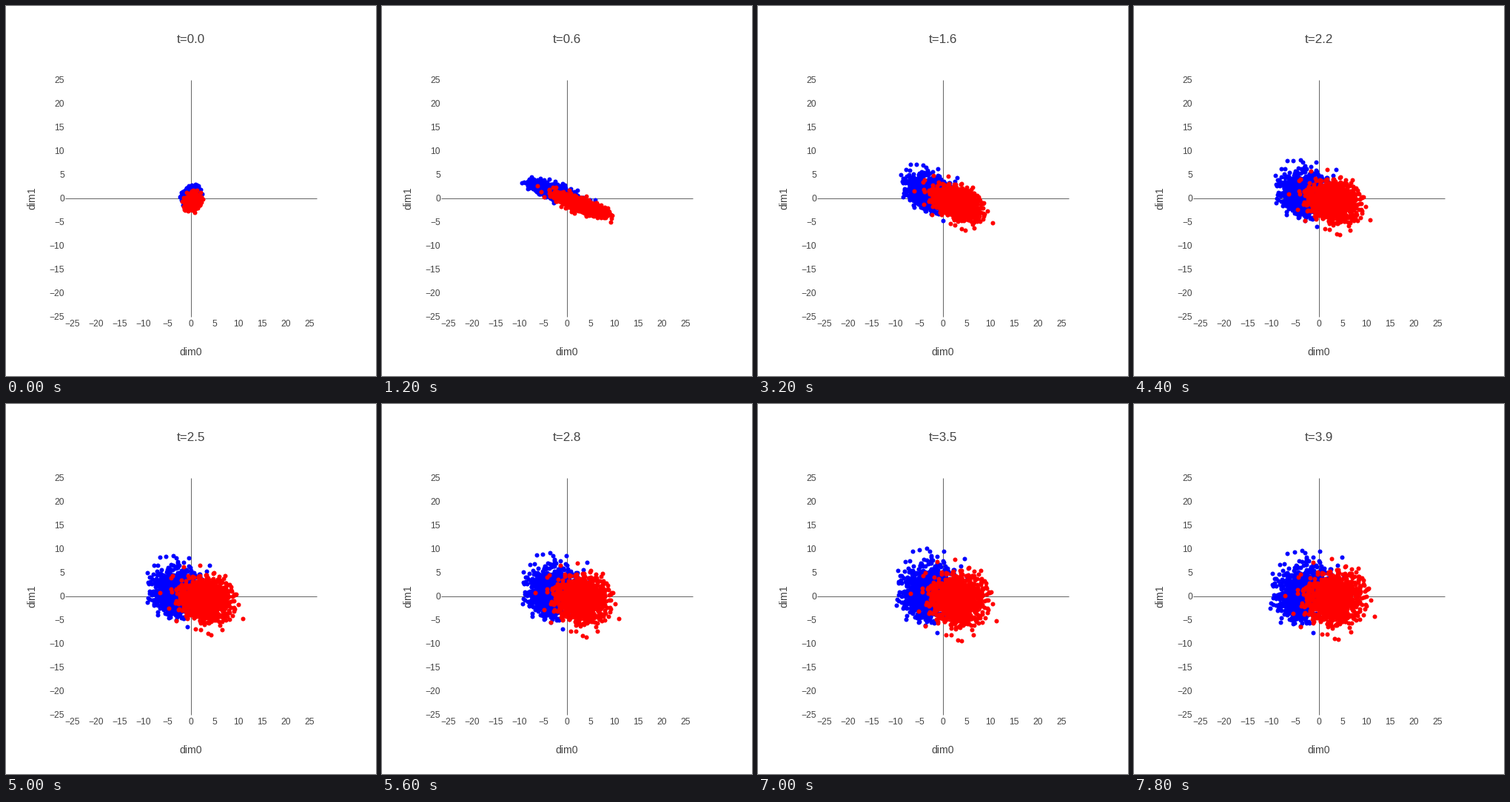
Animation of 500 by 500 pixels, one loop 8000 ms. Source, as a matplotlib script:

```python
import numpy as np
import matplotlib.pyplot as plt
from matplotlib.animation import FuncAnimation

SIZE, DPI = 500, 100
PX = 72 / DPI
FRAMES, INTERVAL = 40, 200
CENTER, UNIT = np.array([250, 260]), 6.4
INK = "#444444"

# The cloud moves by a linear map [[a, b], [c, d]] given at a few times.
KEY_T = [0, 0.6, 1.2, 1.6, 2.2, 2.8, 3.5, 3.9]
KEY_MAP = np.array([
    [0.165, 0.205, -0.165, 0.205],
    [0.92, 0.22, -0.37, 0.18],
    [0.88, 0.02, -0.23, 0.50],
    [0.87, -0.13, -0.16, 0.645],
    [0.93, -0.08, -0.05, 0.79],
    [0.96, -0.03, -0.015, 0.90],
    [1.0, 0.0, 0.0, 1.0],
    [1.04, 0.0, 0.07, 0.99],
])

RED_EDGE = [
    (11.2, -5.1), (2.5, 7.8), (8, 5.5), (5.4, 6.1), (3.9, -9.4), (3.2, -9.2),
    (1.7, -8.2), (0.6, -8.1), (6.4, -8.1), (-3.7, -6.2), (-1.2, 7.3),
    (-3.8, 5), (-4.2, 4.4), (-4.4, 1.7), (-4.3, 1), (-6.9, 0.7),
    (-5.2, -3.2), (10.5, -1.6), (10.1, 1),
]
BLUE_EDGE = [
    (0.1, 9.6), (4.6, 8), (3.8, 6.4), (5, 4.2), (0.4, 6.4), (-1.2, 8.4),
    (-2.5, 8.6), (-2.8, 9.5), (-3.4, 10.1), (-5, 9.8), (-6.4, 9.6),
    (-7.9, 7.4), (-7, 7.5), (-9.5, 5.5), (-9, 4.4), (-9.9, -1.9),
    (-9.7, -0.7), (-7.8, -4.9), (-5.5, -4.6), (-5.2, -5.5), (-3.7, -6.1),
    (-1.2, -7.6),
]


def cloud(rng, center, edge, count=1000):
    """Normal cloud cut to an ellipse, plus a few stray points."""
    pts = rng.normal(0, (2.8, 2.6), (count * 2, 2))
    inside = np.sum((pts / (6.9, 7.3)) ** 2, axis=1) < 1
    return np.vstack([pts[inside][:count] + center, edge])


def to_stage(pts, t):
    a, b, c, d = (np.interp(t, KEY_T, col) for col in KEY_MAP.T)
    x, y = pts.T
    moved = np.column_stack([a * x + b * y, -(c * x + d * y)])
    return CENTER + UNIT * moved


def label(x, y, text, px, **kw):
    style = dict(ha="center", va="baseline", color=INK, family="Liberation Sans")
    style.update(kw)
    return ax.text(x, y, text, fontsize=px * PX, **style)


rng = np.random.default_rng(7)
groups = [
    ("#0000ff", cloud(rng, (-3.0, 1.2), BLUE_EDGE)),
    ("#ff0000", cloud(rng, (3.2, -0.8), RED_EDGE)),
]

fig = plt.figure(figsize=(SIZE / DPI, SIZE / DPI), dpi=DPI, facecolor="white")
ax = fig.add_axes([0, 0, 1, 1])
ax.set_xlim(0, SIZE)
ax.set_ylim(SIZE, 0)
ax.axis("off")

axis_style = dict(color="#666666", lw=PX, solid_capstyle="butt", zorder=1)
ax.plot([80, 420], [260, 260], **axis_style)
ax.plot([250, 250], [100, 420], **axis_style)

for v in range(-25, 26, 5):
    text = str(v).replace("-", "\u2212")
    label(250 + UNIT * v, 433, text, 12)
    label(79, 264.2 - UNIT * v, text, 12, ha="right")

label(250, 472, "dim0", 14)
label(42, 260, "dim1", 14, rotation=90, ha="right", va="center")
title = label(250, 50, "", 17)

dots = [
    ax.scatter([], [], s=(6 * PX) ** 2, color=color, linewidths=0, zorder=2 + i)
    for i, (color, _) in enumerate(groups)
]


def draw(i):
    t = i / 10
    title.set_text(f"t={t:.1f}")
    for dot, (_, pts) in zip(dots, groups):
        dot.set_offsets(to_stage(pts, t))
    return [title, *dots]


anim = FuncAnimation(fig, draw, frames=FRAMES, interval=INTERVAL,
                     init_func=lambda: draw(0), repeat=True, repeat_delay=0)
plt.show()
```
